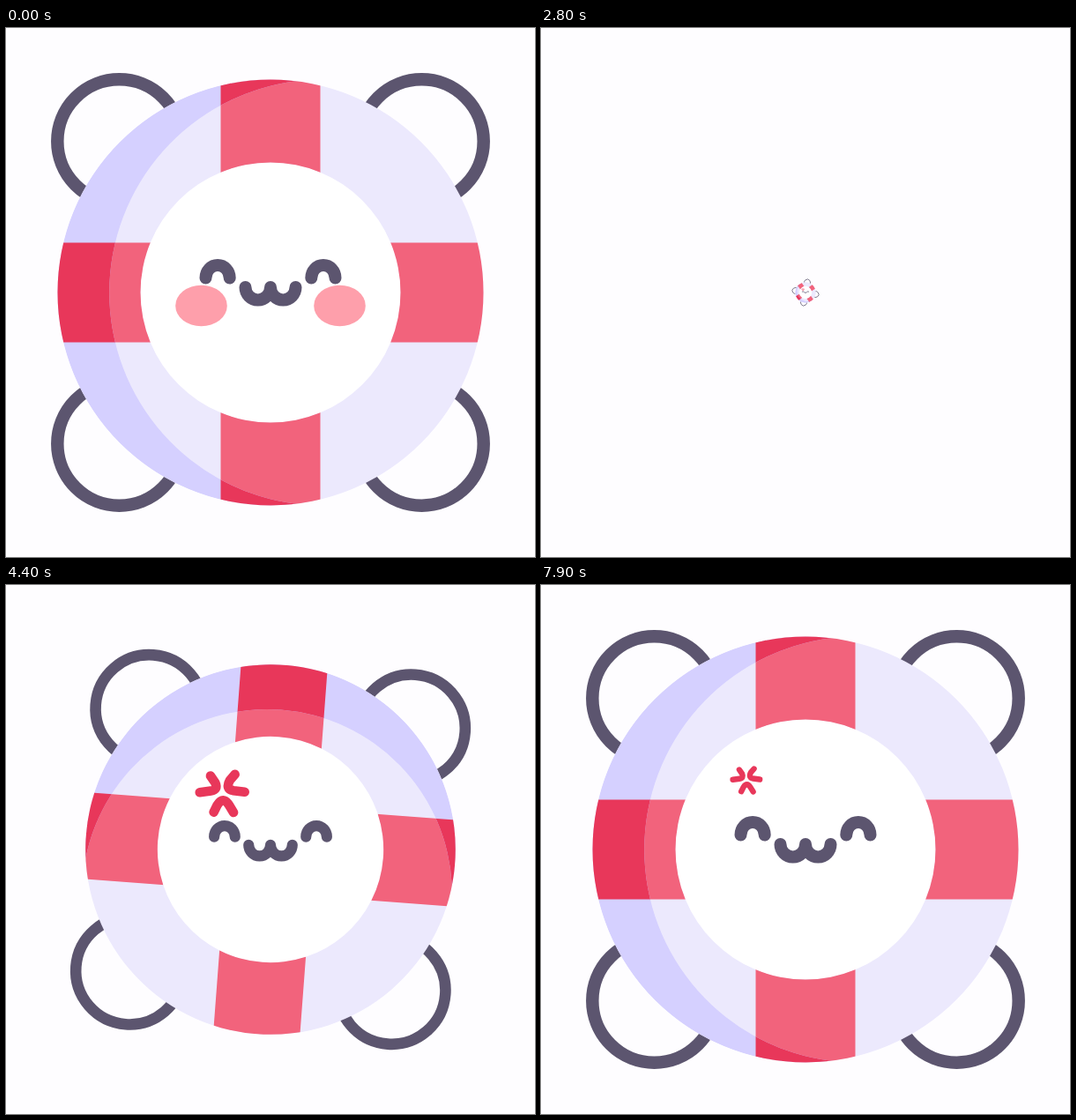
These frames come from a looping animation (600 px wide and 600 px high, 8000 ms). An HTML page:

```html
<!DOCTYPE html>
<html lang="en">
<head>
<meta charset="utf-8">
<title>Lifebuoy</title>
<style>
  html, body { margin: 0; width: 100%; height: 100%; overflow: hidden; background: #fefdff; }
  svg { display: block; width: 100%; height: 100%; }
  .line { fill: none; stroke: #5c556f; stroke-linecap: round; stroke-linejoin: round; stroke-width: 14; }
  #mark { stroke: #e8375a; stroke-width: 13; }
  .rope { fill: none; stroke: #5c556f; stroke-width: 14.5; }
</style>
</head>
<body>
<svg viewBox="-300 -300 600 600">
  <defs>
    <path id="band" d="M-241.5 0a241.5 241.5 0 0 1 483 0a241.5 241.5 0 0 1 -483 0zM-147.5 0a147.5 147.5 0 0 0 295 0a147.5 147.5 0 0 0 -295 0z"/>
    <path id="cross" d="M-56.5 -250h113v500h-113zM-250 -56.5h500v113h-500z"/>
    <clipPath id="ringClip"><use href="#band"/></clipPath>
    <!-- crescent between the rim and the same circle moved right -->
    <clipPath id="shadeClip"><path d="M29.25 -239.7A241.5 241.5 0 1 0 29.25 239.7A241.5 241.5 0 0 1 29.25 -239.7z"/></clipPath>
  </defs>

  <g id="ring">
    <g class="rope">
      <circle cx="-171.5" cy="-171.5" r="70.2"/>
      <circle cx="171.5" cy="-171.5" r="70.2"/>
      <circle cx="-171.5" cy="171.5" r="70.2"/>
      <circle cx="171.5" cy="171.5" r="70.2"/>
    </g>
    <circle r="150" fill="#fff"/>
    <use href="#band" fill="#ece9fd"/>
    <g clip-path="url(#ringClip)">
      <use href="#cross" fill="#f2637c"/>
      <g clip-path="url(#shadeClip)">
        <circle r="243" fill="#d5d0ff"/>
        <use href="#cross" fill="#e8375a"/>
      </g>
    </g>
  </g>

  <g id="face">
    <g id="blush" fill="#fe9fab">
      <ellipse cx="-78.5" cy="15" rx="29.3" ry="23.2"/>
      <ellipse cx="78.5" cy="15" rx="29.3" ry="23.2"/>
    </g>
    <g class="line">
      <path d="M-73.5 -16.5A13.6 14.5 0 0 1 -46.3 -16.5"/>
      <path d="M46.3 -16.5A13.6 14.5 0 0 1 73.5 -16.5"/>
      <path d="M-28.5 -6A14.25 14.5 0 0 0 0 -6A14.25 14.5 0 0 0 28.5 -6"/>
    </g>
  </g>

  <g id="mark" class="line">
    <path d="M-83.5 -102.5L-77 -93Q-72.5 -83 -83 -81.5L-98.5 -79.5"/>
    <path d="M-49.5 -104.5L-56.5 -96.5Q-63.5 -84 -51.5 -82L-36 -80"/>
    <path d="M-79 -52L-74 -62Q-66 -75 -57.5 -61.5L-51.5 -51.5"/>
  </g>
</svg>
<script>
const LOOP = 8000, STEP = 100;
const SHRINK = 967, TURN = 2467, GROWN = 4967, MARK_GROWN = 5133;
const BEAT = 553, DIP = 0.51;
const [ring, face, blush, mark] = ['ring', 'face', 'blush', 'mark'].map(id => document.getElementById(id));

// eased progress from 0 to 1 between two times
function ease(t, from, to) {
  const u = Math.min(1, Math.max(0, (t - from) / (to - from)));
  return u * u * (3 - 2 * u);
}

// 1 down to 1 - DIP and back, one way per beat
function pulse(t) {
  const b = Math.max(0, t - MARK_GROWN) / BEAT % 2;
  return 1 - DIP * ease(b < 1 ? b : 2 - b, 0, 1);
}

function draw(t) {
  const angry = t >= TURN;
  const size = angry ? ease(t, TURN, GROWN) : 1 - ease(t, SHRINK, TURN);
  ring.setAttribute('transform', `rotate(${720 * (1 - size)}) scale(${size})`);
  face.setAttribute('transform', `scale(${size})`);
  blush.style.display = angry ? 'none' : '';
  mark.style.display = angry ? '' : 'none';
  mark.setAttribute('transform',
    `scale(${ease(t, TURN, MARK_GROWN)}) translate(-67 -79) scale(${pulse(t)}) translate(67 79)`);
}

function tick() {
  const t = performance.now() % LOOP;
  draw(Math.floor(t / STEP) * STEP);
  requestAnimationFrame(tick);
}
tick();
</script>
</body>
</html>
```
